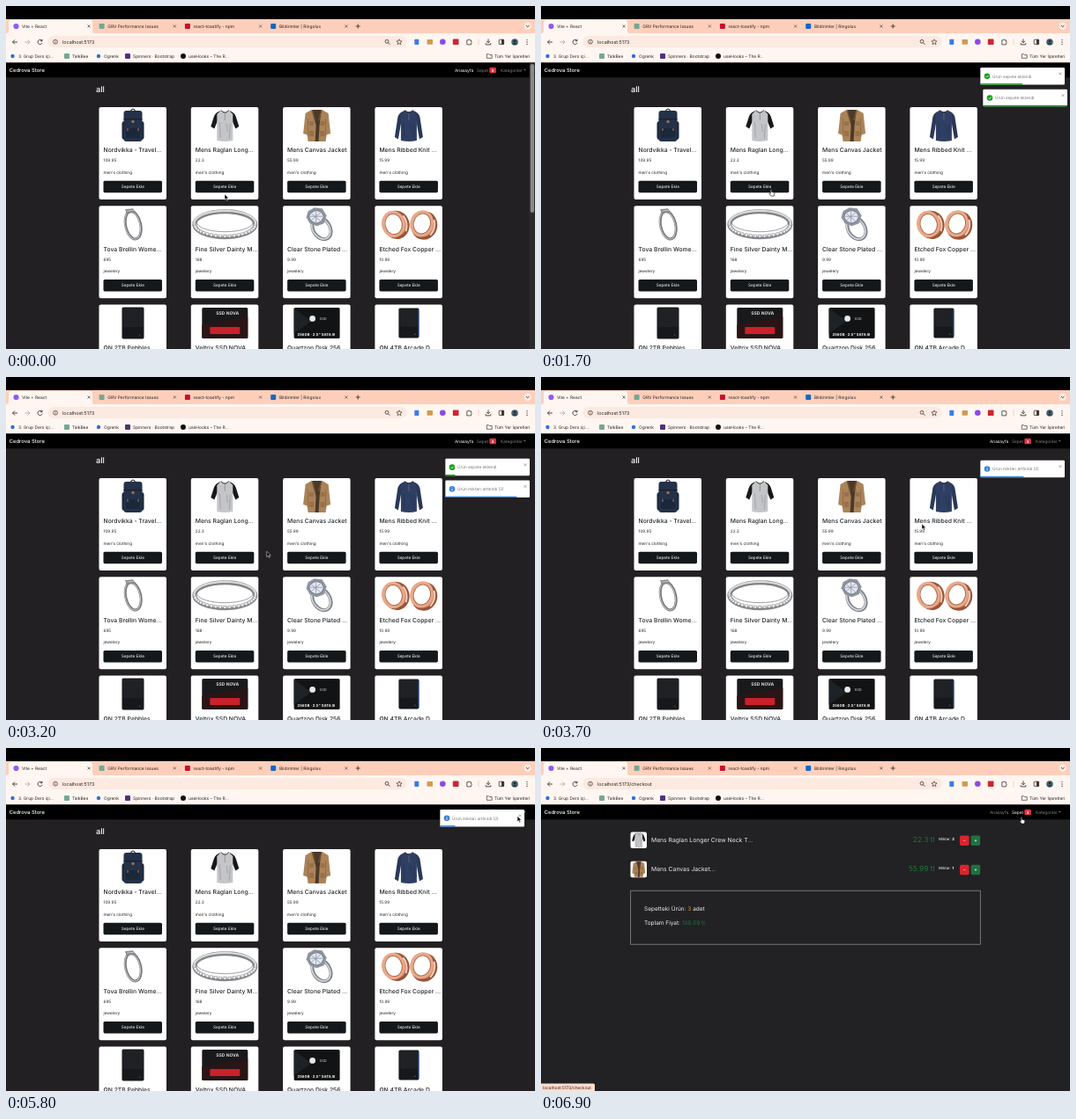
An HTML page that plays this animation: 600x390 px, repeating every 7 s.

```html
<!DOCTYPE html>
<html lang="tr">
<head>
<meta charset="utf-8">
<style>
html, body { margin: 0; width: 100%; height: 100%; overflow: hidden; background: #000; }
svg { display: block; width: 100%; height: 100%; font-family: Inter, "Open Sans", sans-serif; text-rendering: geometricPrecision; }
</style>
</head>
<body>
<svg id="stage" viewBox="0 0 600 390"></svg>
<script>
const LOOP = 7000, STEP = 100, PX = 0.3;
const rect = (x, y, w, h, fill, r = 0, extra = '') =>
  `<rect x="${x}" y="${y}" width="${w}" height="${h}" rx="${r}" fill="${fill}" ${extra}/>`;
const disc = (x, y, r, fill) => `<circle cx="${x}" cy="${y}" r="${r}" fill="${fill}"/>`;
const path = (d, fill, stroke = 'none', w = 1) =>
  `<path d="${d}" fill="${fill}" stroke="${stroke}" stroke-width="${w}"/>`;
const line = (d, stroke = '#3c3431', w = 0.9) => path(d, 'none', stroke, w);
const text = (x, y, size, s, fill = '#222', extra = '') =>
  `<text x="${x}" y="${y}" font-size="${size}" fill="${fill}" ${extra}>${s}</text>`;
const oval = (x, y, rx, ry, stroke, w, fill = 'none') =>
  `<ellipse cx="${x}" cy="${y}" rx="${rx}" ry="${ry}" fill="${fill}" stroke="${stroke}" stroke-width="${w}"/>`;
const group = (x, y, s, content) => `<g transform="translate(${x} ${y}) scale(${s})">${content}</g>`;
const turn = (angle, content) => `<g transform="rotate(${angle})">${content}</g>`;
const cross = (x, y, r, color, w) => line(`M${x - r} ${y - r}l${2 * r} ${2 * r}m0 ${-2 * r}l${-2 * r} ${2 * r}`, color, w);

function browser() {
  const tabs = [['Vite + React', '#8d5bf5'], ['GRV Performance Issues', '#74a794'],
    ['react-toastify - npm', '#c8102e'], ['Bildirimler | Ringolux', '#1467c5']];
  const marks = [[7.5, 14, '3. Grup Ders içi...', '#2f6fd6'], [69, 75, 'TalkBee', '#74a794'],
    [105, 111, 'Ogrenk', '#2f6fd6'], [138, 144, 'Spinners · Bootstrap', '#52307c'],
    [201, 207, 'useHooks – The R...', '#111']];
  let s = rect(0, 15, 600, 17, '#fdcfbb') + rect(0, 31, 600, 33.5, '#fff6f1') +
    path('M1 31q2 0 2-3v-9q0-3 3-3h89q3 0 3 3v9q0 3 2 3z', '#fff6f1');
  tabs.forEach(([name, color], i) => {
    const x = 8 + i * 97.3;
    s += (i ? rect(x + 0.3, 20, 6, 6, color, 1) : disc(11.5, 23, 3.1, color)) +
      text(x + 10, 24.8, 4.9, name) + cross(x + 86, 23, 1.5, '#4b4240', 0.7);
  });
  s += line('M396.7 23h5m-2.5-2.5v5') + disc(591.7, 22.8, 4.2, '#feeae1') + line('M589.9 22l1.8 1.8 1.8-1.8') +
    line('M13 41H7.5m2.5-2.5L7.5 41l2.5 2.5') + line('M21.5 41H27m-2.5-2.5L27 41l-2.5 2.5', '#b5aaa5') +
    line('M40.8 39.5a2.6 2.6 0 1 0 .3 2.3M41 37.8v2h-2') +
    rect(47.5, 34, 407, 13, '#fce9e0', 6.5) + oval(56, 40.7, 2.4, 2.4, '#3c3431', 0.7) +
    line('M56 40.2v2m0-3.1v.6', '#3c3431', 0.6) +
    `<text id="url" x="64" y="42.6" font-size="5.4" fill="#222"></text>` +
    oval(432, 40.3, 1.9, 1.9, '#3c3431', 0.8) + line('M433.4 41.7l2 2') +
    path('M446 37.8l.9 2 2.2.2-1.7 1.5.5 2.1-1.9-1.1-1.9 1.1.5-2.1-1.7-1.5 2.2-.2z', 'none', '#3c3431', 0.7) +
    rect(463.3, 37.7, 5, 6.4, '#3c7bea', 0.8) + rect(477.5, 38, 6.5, 5.8, '#cf9b50', 0.8) +
    disc(495.3, 40.8, 3.3, '#8b49e8') + rect(506.8, 37.6, 6.7, 6.4, '#cb2631', 0.8) +
    path('M522.8 38.8h1.6q.6-2 1.4 0h1.7v1.8q2 .7 0 1.5v1.8h-4.7z', 'none', '#3c3431', 0.8) +
    line('M536 37.5v7', '#f4bda5', 0.7) +
    line('M547 37.5v4.2m-2-1.9l2 2 2-2m-4.8 2.4v1.7h5.6v-1.7') +
    rect(559.2, 38.2, 5.4, 5.4, 'none', 0.6, 'stroke="#3c3431" stroke-width=".8"') + rect(562, 38, 2.8, 5.8, '#3c3431') +
    disc(577, 41, 3.8, '#45606f') + disc(577, 40, 1.3, '#20262b') + path('M574.5 43.6q2.5-3.4 5 0z', '#20262b') +
    [38.6, 41, 43.4].map(y => disc(591, y, 0.65, '#3c3431')).join('');
  marks.forEach(([x, tx, name, color], i) => {
    s += (i % 2 ? rect(x - 3, 54, 6, 6, color, 1) : disc(x, 57, i == 4 ? 3 : 2.2, color)) + text(tx, 58.7, 4.9, name);
  });
  return s + path('M545.3 59.3v-4.6h2.2l.8.9h2.9v3.7z', 'none', '#3c3431', 0.7) + text(554, 58.7, 4.9, 'Tüm Yer İşaretleri');
}

// Product pictures, each about 40 units high around the origin.
const shirt = (body, sleeve, elbow) => {
  const arm = `M5-17Q11-15 12.5-10L16 ${elbow}l-4 2.5L8.5-5z`;
  return path(arm, sleeve) + `<g transform="scale(-1 1)">${path(arm, sleeve)}</g>` +
    path('M-4.5-17.5Q0-14 4.5-17.5L9-13 9 17Q0 19-9 17L-9-13z', body) +
    line('M-4.5-17.5Q0-12 4.5-17.5', '#333', 1) + line('M0-14v8', '#777', 0.6) +
    line('M-6-4l1 18M6-2L5 15M2-2l1 9', 'rgba(0,0,0,.15)', 1.2);
};
const ring = (x, tilt) => `<g transform="translate(${x} 0) rotate(${tilt})">` +
  oval(1.8, 1, 13, 14.5, '#9a5439', 3.5, '#c98868') + oval(-1.5, -0.5, 11.5, 13.5, '#e8a98a', 3.5, '#fff') +
  oval(-1.2, -0.4, 9.6, 11.6, '#b06848', 1) + line('M11-8q5 9 0 18', '#f7d3bf', 1.8) + '</g>';
const stones = n => Array.from({length: n}, (_, i) => {
  const a = Math.PI * (0.05 + 0.9 * i / (n - 1)), x = 34 * Math.cos(a), y = 1 + 12.5 * Math.sin(a);
  return disc(x, y, 1.9, '#8f9194') + disc(x, y, 1.3, '#f4f4f5');
}).join('');
const disk = (w, h) => rect(-w / 2, -h / 2, w, h, '#17181b', 1.6) +
  rect(-w / 2 + 1, -h / 2 + 1, w - 2, h * 0.6, '#202125', 1) + disc(w * 0.3, h * 0.38, 0.7, '#666');
const pictures = [
  line('M-3-16q3-6 6 0', '#1e2838', 1.2) + rect(-12.5, -5, 25, 21, '#1c2739', 3) + rect(-10.5, -17, 21, 35, '#233149', 3) +
    rect(-10.5, -8, 21, 1.2, '#18202f') + rect(-8, 3, 16, 11, '#1b273b', 1) + disc(0, -4.5, 1.7, '#a46b42') +
    line('M-6 3v3m12-3v3', '#a46b42', 1.2),
  shirt('#c4c5c8', '#17181b', 1),
  path('M-6-18L-13-14-15.5 9l4.5 1.5L-10 18H10l1-7.5 4.5-1.5L13-14 6-18z', '#ab8359') +
    path('M-5-18L-1 0-2 18h4l1-18 2-18z', '#4b3929') + line('M-10-8v20M10-8v20', '#8a6541', 0.8) +
    line('M-5-17l3 11M5-17l-3 11', '#6d4d31', 1.6) + rect(-8.5, -5, 5, 5, '#98714a') + rect(3.8, -5, 5, 5, '#98714a') +
    rect(-8.5, 6, 5, 6, '#98714a') + rect(3.8, 6, 5, 6, '#98714a'),
  shirt('#2f3f64', '#293857', 13),
  turn(-12, oval(0, 1, 8.5, 16, '#737578', 3) + oval(-0.6, 1, 8.5, 16, '#c6c8ca', 1)) +
    path('M-9-17L0-18 3-14-7-12z', '#85878a') + line('M-7-15l8-1', '#ddd', 0.8),
  oval(0, 0, 34.5, 14.5, '#85878a', 5) + oval(0, -1.2, 34.8, 14, '#d9dadc', 2.4) +
    oval(0, -2.5, 32, 11, '#747679', 0.7) + stones(19),
  turn(-32, oval(2, 7, 9.5, 13, '#80848b', 4) + oval(1.5, 6.5, 9.5, 13, '#dadde2', 1.5)) +
    path('M-10-15L-3-19 6-18 11-10 8-1 0 2-8-1-12-8z', '#8f959f') +
    path('M-7-13L-1-16 5-14 8-9 5-3-1-1-7-4-9-9z', '#e4e9f1', '#6f7783', 0.9) +
    line('M-7-13L5-3M5-14L-7-4M-9-9H8M-1-16v15', '#8c95a5', 0.8),
  ring(-16, -10) + ring(16, 14),
  disk(25, 36),
  rect(-26, -17.5, 52, 35, '#19191b', 1.5) + text(-10, -9.5, 5, 'SSD NOVA', '#ddd', 'font-weight="700"') +
    path('M-26 2L26-7V17H-26z', '#2a1416') + rect(-17, 4.5, 34, 8, '#c9222a', 1),
  rect(-26, -17.5, 52, 35, '#111315', 1.5) + path('M-26-17L-6-2-26 12z', '#1d2226') + disc(-5, -5, 3.4, '#e6e8ea') +
    text(3, -3.4, 4, 'SSD', '#ddd') + text(-22, 14.4, 4.2, '256GB · 2.5" SATA III', '#eee', 'font-weight="700"'),
  disk(23, 34) + line('M11-15V15', '#1f4fa0', 0.9)
];

const products = [['Nordvikka - Travel...', '109.95'], ['Mens Raglan Long...', '22.3'],
  ['Mens Canvas Jacket', '55.99'], ['Mens Ribbed Knit ...', '15.99'],
  ['Tova Brellin Wome...', '695'], ['Fine Silver Dainty M...', '168'],
  ['Clear Stone Plated ...', '9.99'], ['Etched Fox Copper ...', '10.99'],
  ['QN 2TB Pebbles ...', ''], ['Veltrix SSD NOVA...', ''], ['Quartzon Disk 256...', ''], ['QN 4TB Arcade D...', '']];

const shop = () => text(102, 98, 9.2, 'all', '#fff', 'font-weight="500"') + products.map(([name, price], i) => {
  const x = 105.5 + i % 4 * 104.3, row = i >> 2, y = 115 + row * 112.2;
  return rect(x, y, 76.5, 105, '#fff', 2) + group(x + 38.5, y + 21, 1, pictures[i]) +
    text(x + 5, y + 51.3, 6.8, name, '#212529', 'font-weight="500"') + text(x + 5, y + 62.3, 4.7, price) +
    text(x + 5, y + 75.7, 4.7, row ? 'jewelery' : "men's clothing") +
    rect(x + 5, y + 83.7, 66.5, 13.5, '#15181b', 1.6) +
    text(x + 38.3, y + 92.2, 4.7, 'Sepete Ekle', '#fff', 'text-anchor="middle"');
}).join('');

function checkout() {
  const row = (y, pic, name, price, count) => rect(101.5, y, 18.5, 18.5, '#fff', 2) +
    group(110.8, y + 9.3, 0.48, pictures[pic]) + text(125, y + 11.4, 6.8, name, '#eee') +
    text(446.5, y + 11.7, 8.4, price + ' tl', '#1f7440', 'text-anchor="end"') +
    text(451, y + 9, 4.3, `Miktar: <tspan font-weight="700">${count}</tspan>`, '#fff') +
    rect(475, y + 4, 10.6, 11.5, '#d9252f', 1.7) + rect(487.6, y + 4, 10.6, 11.5, '#1e7140', 1.7) +
    line(`M479.4 ${y + 9.8}h1.8`, '#fff', 0.6) + line(`M491.8 ${y + 9.8}h2.4m-1.2-1.2v2.4`, '#fff', 0.6);
  return rect(0, 81, 600, 309, '#222123') +
    row(95.5, 1, 'Mens Raglan Longer Crew Neck T...', '22.3', 2) + row(128.7, 2, 'Mens Canvas Jacket...', '55.99', 1) +
    rect(101.7, 162.2, 396.6, 61, 'none', 0, 'stroke="#999" stroke-width=".7"') +
    text(117, 185, 6.5, 'Sepetteki Ürün: <tspan fill="#e39032">3</tspan> adet', '#eee') +
    text(117, 201, 6.5, 'Toplam Fiyat: <tspan fill="#1f7440">100.59 tl</tspan>', '#eee');
}

const nav = rect(0, 64.5, 600, 16.8, '#000') + text(3.7, 75.2, 5.9, 'Cedrova Store', '#fff', 'font-weight="500"') +
  '<g font-size="4.8"><text id="home" x="509" y="74.6">Anasayfa</text><text id="cart" x="534" y="74.6">Sepet</text></g>' +
  rect(548.3, 69.8, 7.6, 6.4, '#dc3545', 1.5) +
  '<text id="badge" x="552.1" y="74.5" font-size="3.9" font-weight="700" fill="#fff" text-anchor="middle"></text>' +
  text(561, 74.6, 4.8, 'Kategoriler', '#858585') + path('M587 72h2.6l-1.3 1.4z', '#858585');

// start: entrance begins, end: exit begins, pause: hover stops the countdown
const toasts = [
  {start: 250, end: 2450, label: 'Ürün sepete eklendi', color: '#12a119'},
  {start: 1175, end: 3375, label: 'Ürün sepete eklendi', color: '#12a119'},
  {start: 2270, end: 5660, pause: 4200, label: 'Ürün miktarı arttırıldı (2)', color: '#3a80d8', info: true}
];
const toastShape = ({label, color, info}, i) => `<g id="toast${i}">` +
  rect(498.3, 70.6, 96, 19.6, '#000', 1.4, 'opacity=".25"') + rect(498.3, 70, 95.7, 19.5, '#fff', 1.3) +
  disc(506, 79.8, 3.3, color) + (info ? line('M506 79.3v2.6m0-4.2v.8', '#fff', 0.8) : line('M504.4 79.9l1.2 1.2 2.2-2.5', '#fff', 0.8)) +
  text(512, 81.5, 4.7, label, '#757575') + cross(589, 76.9, 1.4, '#777', 0.6) +
  `<rect id="bar${i}" x="498.3" y="88.1" height="1.4" fill="${color}"/></g>`;

const arrow = path('M0 0v6.2l1.5-1.3 1 2.3 1.1-.5-1-2.2h2z', '#000', '#fff', 0.5);
const hand = path('M-.7 0q.7-.8 1.3 0v2.3l2.6.7q.8.3.7 1.2l-.6 2.9h-3.2l-2.2-2.8q.2-.9 1.4 0z', '#fff', '#000', 0.6);

document.getElementById('stage').innerHTML = browser() + rect(0, 81, 600, 309, '#222022') + shop() +
  `<g id="checkout">${checkout()}</g>` + nav +
  `<g id="scroll">${rect(593.5, 65, 6.5, 325, '#2c2b2c') + rect(594.7, 66, 4.4, 169, '#8b8a8b', 2.2)}</g>` +
  toasts.map(toastShape).join('') +
  `<g id="status">${rect(-2, 381.5, 63, 10, '#fcdccd', 1.5) + text(2, 387.6, 4.8, 'localhost:5173/checkout')}</g>` +
  `<g id="arrow">${arrow}</g><g id="hand">${hand}</g>`;
const el = id => document.getElementById(id);
const set = (id, attrs) => Object.entries(attrs).forEach(([k, v]) => el(id).setAttribute(k, v));
const show = (id, on) => set(id, {visibility: on ? 'visible' : 'hidden'});

const clamp = u => Math.max(0, Math.min(1, u));
const smooth = u => u * u * (3 - 2 * u);
const easeOut = power => u => 1 - (1 - u) ** power;
function keyed(stops, t, ease) {
  const k = Math.max(1, stops.findIndex(s => s[0] >= t));
  const [t0, a] = stops[k - 1], [t1, b] = stops[k];
  return a + (b - a) * ease(clamp((t - t0) / (t1 - t0)));
}
const bounceIn = [[0, 3000], [0.6, -25], [0.75, 10], [0.9, -5], [1, 0]];
const bounceOut = [[0, 0], [0.2, -20], [1, 2000]];
const BOUNCE = 700, COUNTDOWN = 1500, COLLAPSE = 300;

const cursor = [[0, 248, 214], [200, 250, 208], [450, 252, 207], [800, 300, 206], [1050, 345, 205], [1350, 340, 206],
  [1600, 285, 208], [1700, 261, 209], [2700, 257, 208], [3000, 262, 206], [3700, 432, 167], [4250, 556, 86],
  [4500, 559, 78.5], [5000, 565, 79], [5600, 580, 77.5], [5800, 580, 77.5], [6100, 560, 83], [6350, 560, 83],
  [6500, 545, 79], [LOOP, 545, 79]];

function draw(t) {
  let slot = 0;
  toasts.forEach(({start, end, pause = Infinity}, i) => {
    const x = PX * (t < end ? keyed(bounceIn, clamp((t - start) / BOUNCE), easeOut(3))
      : keyed(bounceOut, clamp((t - end) / BOUNCE), easeOut(2)));
    const left = 1 - clamp((Math.min(t, pause) - start - BOUNCE) / COUNTDOWN);
    show('toast' + i, t >= start && t < end + BOUNCE);
    set('toast' + i, {transform: `translate(${x} ${slot * 24.7})`});
    set('bar' + i, {width: 95.7 * left});
    if (t >= start) slot += 1 - smooth(clamp((t - end - BOUNCE) / COLLAPSE));
  });

  const paid = t >= 6600, bright = '#fff', dim = '#858585';
  show('checkout', paid);
  show('status', t >= 6500);
  el('url').textContent = 'localhost:5173' + (paid ? '/checkout' : '');
  el('badge').textContent = toasts.filter(n => t >= n.start).length;
  set('home', {fill: paid ? dim : bright});
  set('cart', {fill: t >= 6500 ? bright : dim});
  set('scroll', {opacity: 1 - clamp((t - 300) / 300)});

  const x = keyed(cursor, t, smooth), y = keyed(cursor.map(c => [c[0], c[2]]), t, smooth);
  const pointing = t >= 6500 || (y > 198.5 && y < 212 && (x - 110.5) % 104.3 < 66.5);
  show('hand', pointing);
  show('arrow', !pointing);
  set(pointing ? 'hand' : 'arrow', {transform: `translate(${x} ${y})`});
}

function tick() {
  draw(Math.floor(performance.now() % LOOP / STEP) * STEP);
  requestAnimationFrame(tick);
}
tick();
</script>
</body>
</html>
```
